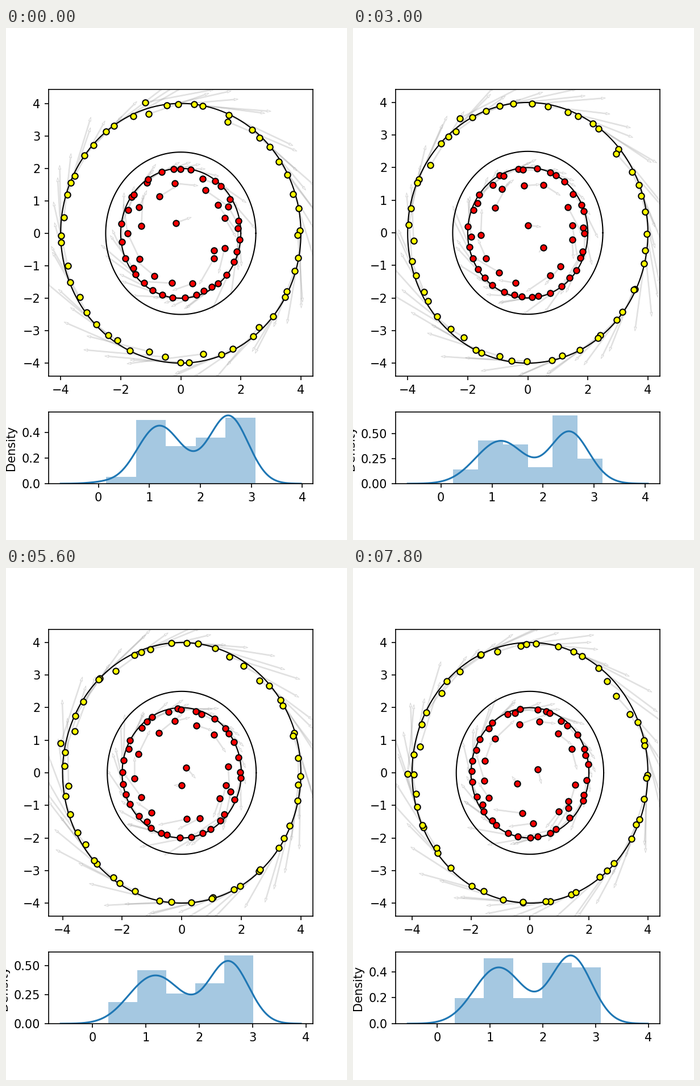
Animation, 600 px wide and 900 px high, one loop 8 s. Source, as a matplotlib script:

```python
import numpy as np
import matplotlib.pyplot as plt
from matplotlib.animation import FuncAnimation

FRAMES, INTERVAL = 40, 200
LAST = FRAMES - 1
BANDWIDTH = 0.297
N_OUTER, N_INNER, N_CORE = 49, 35, 13
COUNT = N_OUTER + N_INNER + N_CORE + 3

# Speed histogram at a few moments: lowest, highest, particles per bin.
SPEEDS = {
    0: (0.15, 3.08, [3, 29, 17, 21, 30]),
    5: (0.17, 3.08, [3, 18, 25, 6, 28, 20]),
    9: (0.20, 3.15, [4, 23, 19, 7, 35, 12]),
    15: (0.24, 3.16, [7, 21, 19, 8, 33, 12]),
    24: (0.29, 3.10, [11, 25, 13, 25, 26]),
    31: (0.30, 2.95, [9, 25, 15, 15, 36]),
    39: (0.33, 3.10, [11, 28, 11, 26, 24])}
KEYS = list(SPEEDS)

rng = np.random.default_rng(4)


def bell(x, mean, sd):
    return np.exp(-0.5 * ((x - mean) / sd) ** 2) / (sd * np.sqrt(2 * np.pi))


def sorted_speeds(low, high, counts):
    """Sorted speeds that fill the bins, gathered around the two modes."""
    x = np.linspace(low, high, 3001)
    n = len(counts)
    which = np.minimum((np.linspace(0, 1, x.size) * n).astype(int), n - 1)
    shape = bell(x, 1.18, 0.34) + bell(x, 2.55, 0.25)
    share = np.array(counts) / np.bincount(which, shape)
    s = np.interp(np.arange(COUNT) + 0.5, np.cumsum(shape * share[which]), x)
    s[0], s[-1] = low, high
    return s


def ring(n, radius, depth, rate):
    """Clockwise swarm on a circle; each member dips slowly inside it."""
    phase = np.pi - 2 * np.pi * (np.arange(n) + rng.normal(0, 0.22, n)) / n
    spin = np.radians(rng.normal(rate, 0.05, n))
    dip = rng.exponential(depth, n)
    sway = rng.uniform(0, 2 * np.pi, n)

    def at(i):
        r = radius - dip * (0.6 + 0.4 * np.cos(sway + i / 12))
        return r * np.exp(1j * (phase - spin * i))
    return at


outer = ring(N_OUTER, 4, 0.06, 1.72)
inner = ring(N_INNER, 2, 0.07, 1.87)
core = ring(N_CORE, 1.6, 0.16, 1.8)


def stray(i):
    """The one outer particle that runs against the flow."""
    angle = np.interp(i, [0, 15, 31, 39], [106.4, 122.8, 177.8, 180.5])
    return (4.2 - 0.05 * i / LAST) * np.exp(1j * np.radians(angle))


def drifters(i):
    """Two particles that cross the middle in straight lines."""
    t = i / LAST
    return [-0.16 + 0.32j + (0.43 - 0.22j) * t, 1.11 - 0.53j + (-1.54 + 0.2j) * t]


def positions(i):
    return np.concatenate([[stray(i)], outer(i), inner(i), core(i), drifters(i)])


mean_radius = abs(positions(LAST / 2))
rank = np.argsort(np.argsort(mean_radius + rng.normal(0, 0.3, COUNT)))
tilt = np.exp(1j * rng.normal(0, 0.1, COUNT))
speed_keys = np.array([sorted_speeds(*s) for s in SPEEDS.values()])
bin_keys = [len(counts) for _, _, counts in SPEEDS.values()]


def draw_particles(i, speeds):
    z = positions(i)
    v = -1j * z / abs(z) * tilt * speeds[rank]
    top.clear()
    top.quiver(z.real, z.imag, v.real, v.imag, scale=10, width=0.003,
               facecolors="none", edgecolors="gray", linewidths=0.5, alpha=0.3)
    a = np.linspace(0, 2 * np.pi, 361)
    for r in (2, 2.5, 4):
        top.plot(r * np.cos(a), r * np.sin(a), color="black", lw=1)
    split = N_OUTER + 1
    for part, color in ((z[:split], "yellow"), (z[split:], "red")):
        top.plot(part.real, part.imag, "o", ms=5, mfc=color, mec="black", mew=1)


def draw_density(i, speeds):
    low.clear()
    bins = int(np.interp(i, KEYS, bin_keys))
    low.hist(speeds, bins=bins, density=True, color="C0", alpha=0.4)
    x = np.linspace(speeds[0] - 3 * BANDWIDTH, speeds[-1] + 3 * BANDWIDTH, 200)
    low.plot(x, bell(x[:, None], speeds, BANDWIDTH).mean(axis=1), color="C0", lw=1.5)
    low.set_ylabel("Density")


def draw(i):
    speeds = np.array([np.interp(i, KEYS, s) for s in speed_keys.T])
    draw_particles(i, speeds)
    draw_density(i, speeds)
    return []


fig, (top, low) = plt.subplots(2, 1, figsize=(4, 6), dpi=150,
                               gridspec_kw={"height_ratios": [4, 1]})
anim = FuncAnimation(fig, draw, frames=FRAMES, interval=INTERVAL,
                     init_func=lambda: draw(0), repeat=True, repeat_delay=0)
plt.show()
```
